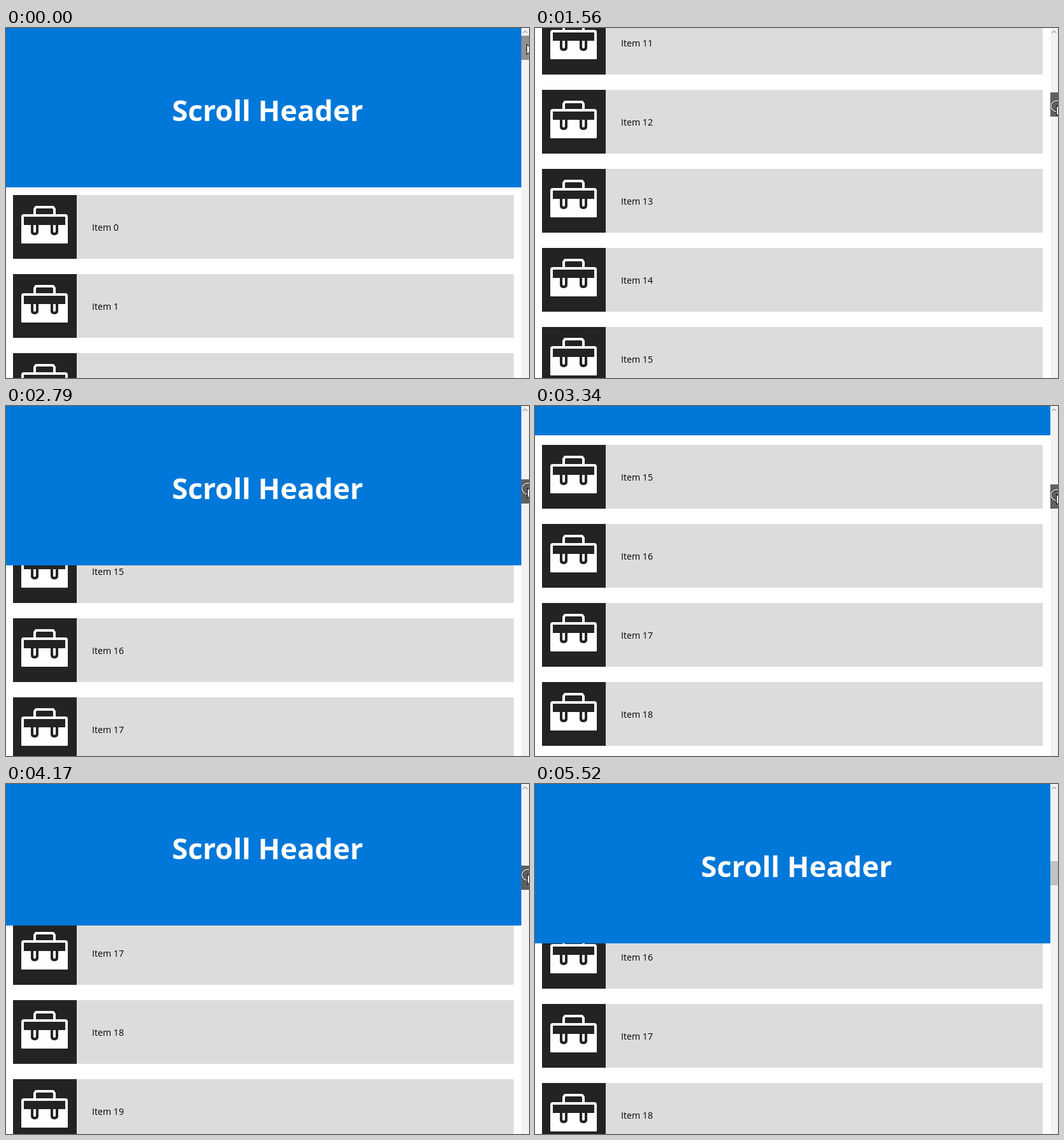
These frames come from a looping animation (821 px wide and 549 px high, 5.8 s). An HTML page with a canvas:

```html
<!DOCTYPE html>
<html lang="en">
<head>
<meta charset="utf-8">
<title>Scroll Header</title>
<style>
html, body { margin: 0; width: 100%; height: 100%; overflow: hidden; background: #fff; }
canvas { display: block; }
</style>
</head>
<body>
<canvas id="stage" width="821" height="549"></canvas>
<script>
const ctx = document.getElementById('stage').getContext('2d');
const W = 821, H = 549, LOOP = 5800;
const HEADER = 250, PITCH = 124, TRACK = 809, PER_PIXEL = 18.57;
const PRESS = 440, RELEASE = 4710, LEAVE = 4840;
const FONT = '"Open Sans", "Noto Sans", sans-serif';

// [time, scroll offset] while the thumb is dragged
const drag = [
  [0, 0], [870, 19], [990, 74], [1140, 223], [1290, 687], [1440, 1207],
  [1560, 1653], [1710, 1950], [1850, 2173], [2000, 2136], [2120, 2099],
  [2250, 2062], [2370, 2025], [2520, 1987], [2640, 1950], [2790, 1913],
  [3070, 1857], [3210, 1950], [3340, 2061], [3490, 2210], [3610, 2340],
  [3760, 2377], [3890, 2321], [4040, 2247], [4170, 2155], [4290, 2135],
  [4440, 2080], [4560, 2025]
];

// [time, x, y] of the pointer after the release
const exit = [
  [4710, 817, 155], [4840, 815, 245], [4990, 811, 350], [5110, 806, 467],
  [5260, 804, 500], [5380, 804, 535], [5520, 804, 600]
];

// The header leaves with the content and returns on any upward scroll
let shift = 0, previous = 0;
const poses = drag.map(([time, scroll]) => {
  const delta = scroll - previous;
  shift = Math.max(-HEADER, Math.min(0, shift - delta));
  previous = scroll;
  return { time, scroll, shift, lag: Math.max(0, delta) * 0.016 };
});

function rect(color, x, y, w, h, radius = 0) {
  ctx.fillStyle = color;
  ctx.beginPath();
  ctx.roundRect(x, y, w, h, radius);
  ctx.fill();
}

function label(text, x, y, font, color, align) {
  ctx.font = font + ' ' + FONT;
  ctx.fillStyle = color;
  ctx.textAlign = align;
  ctx.fillText(text, x, y);
}

function toolbox() {
  const dark = '#232323', light = '#fff';
  rect(dark, 0, 0, 100, 100);
  ctx.strokeStyle = light;
  ctx.lineWidth = 4;
  ctx.lineJoin = 'round';
  ctx.stroke(new Path2D('M34 32V22L36 19H63L65 22V32'));
  rect(light, 13, 30, 73, 46, [4, 4, 1, 1]);
  rect(dark, 17, 34, 65, 13);
  for (const x of [28, 59]) {
    rect(dark, x, 45, 12, 18, [0, 0, 5, 5]);
    rect(light, x + 4, 47, 4, 12, [0, 0, 2, 2]);
  }
}

function item(index, y) {
  rect('#dcdcdc', 111, y, 686, 100);
  ctx.save();
  ctx.translate(11, y);
  toolbox();
  ctx.restore();
  label('Item ' + index, 135, y + 56, '14.2px', '#000', 'left');
}

function header(y) {
  rect('#0078d9', 0, y, TRACK, HEADER);
  label('Scroll Header', W / 2, y + 146, 'bold 45.3px', '#fff', 'center');
}

function scrollbar(thumb, color) {
  rect('#f2f2f2', TRACK, 0, W - TRACK, H);
  rect(color, TRACK, thumb, W - TRACK, 38);
  ctx.strokeStyle = '#606060';
  ctx.lineWidth = 1;
  ctx.stroke(new Path2D('M811.5 8L815 4.5L818.5 8'));
}

function ring(x, y) {
  for (const [color, width] of [['#222', 3], ['#fff', 1.4]]) {
    ctx.strokeStyle = color;
    ctx.lineWidth = width;
    ctx.beginPath();
    ctx.arc(x, y, 8.5, 0, Math.PI * 2);
    ctx.stroke();
  }
}

function arrow(x, y) {
  const shape = new Path2D('M.5 .5V16.5L4.3 13L7 18.5L9.3 17.5L6.8 12.2H11.8Z');
  ctx.save();
  ctx.translate(x, y);
  ctx.fillStyle = '#fff';
  ctx.strokeStyle = '#000';
  ctx.lineWidth = 1;
  ctx.lineJoin = 'miter';
  ctx.fill(shape);
  ctx.stroke(shape);
  ctx.restore();
}

function draw(t) {
  const pose = poses.findLast(p => p.time <= t);
  const thumb = 12 + Math.round(pose.scroll / PER_PIXEL);
  const pressed = t >= PRESS && t < RELEASE;

  rect('#fff', 0, 0, W, H);
  const first = Math.max(0, Math.floor((pose.scroll - 262) / PITCH));
  for (let i = first; i < first + 7; i++) item(i, 262 + i * PITCH - pose.scroll);
  if (pose.shift > -HEADER) header(pose.shift);
  scrollbar(thumb, pressed ? '#606060' : t < LEAVE ? '#919191' : '#c2c2c2');

  if (t >= RELEASE) {
    const [, x, y] = exit.findLast(e => e[0] <= t);
    arrow(x, y);
  } else {
    const y = Math.round(thumb + 13 + pose.lag);
    if (pressed) ring(818.5, y + 1.5);
    arrow(pressed ? 818 : 817, y);
  }
}

function tick() {
  draw(performance.now() % LOOP);
  requestAnimationFrame(tick);
}
tick();
</script>
</body>
</html>
```
